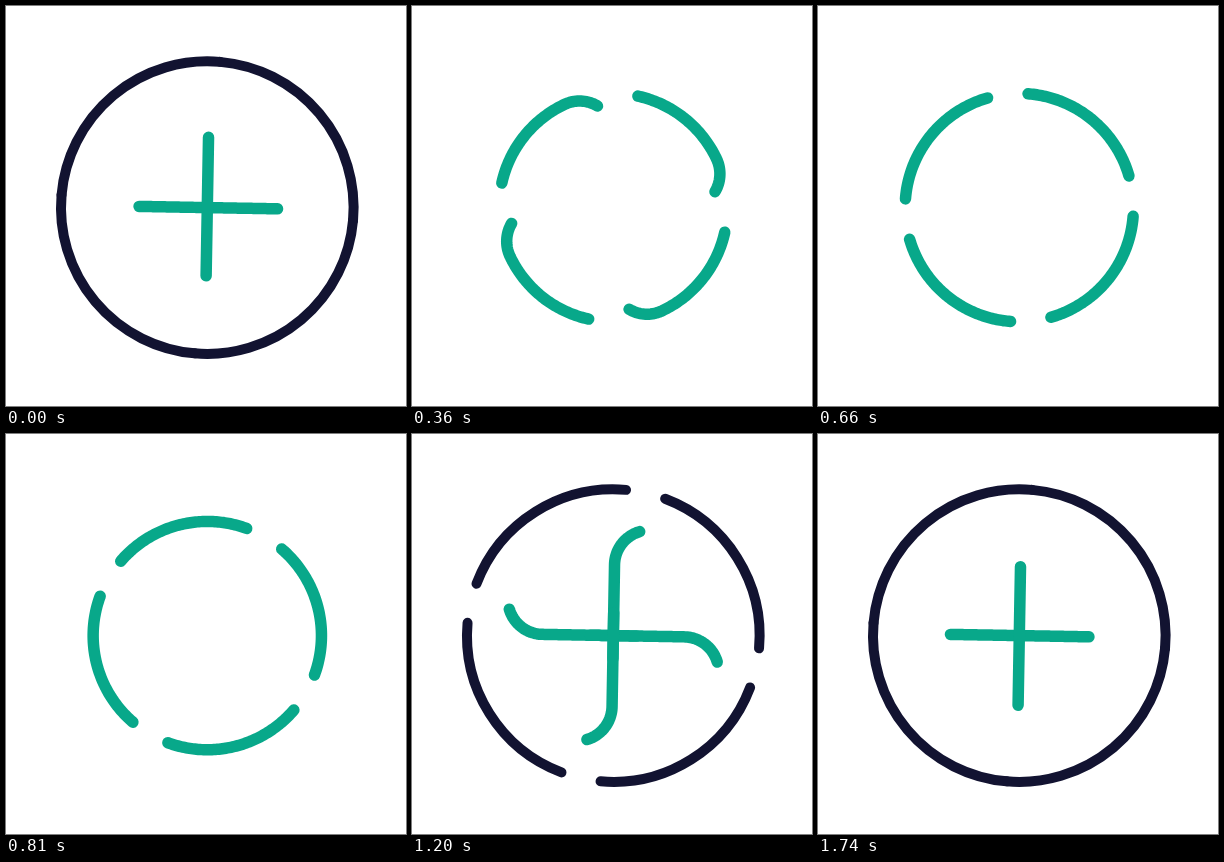
Recreate the animation shown at these times as an HTML page with a canvas. Size 400 by 400 pixels, loop 1.86 s.

```html
<!DOCTYPE html>
<html lang="en">
<head>
<meta charset="utf-8">
<title>Plus loop</title>
<style>
html, body { margin: 0; width: 100%; height: 100%; overflow: hidden; background: #fff; }
canvas { display: block; width: 400px; height: 400px; }
</style>
</head>
<body>
<canvas id="stage"></canvas>
<script>
const canvas = document.getElementById('stage');
const ctx = canvas.getContext('2d');
const dpr = window.devicePixelRatio || 1;
canvas.width = canvas.height = 400 * dpr;

const LOOP = 1860, LAST = 1740, STEP = 30;
const CX = 201.3, CY = 201.6, RAD = Math.PI / 180;
const TILT = RAD;
const RING = 146.3;

// Track of one stroke: out along an arm, round a bend, onto the circle, and back in
const HALF = 69.25, ARM = 71, BEND = 35;
const HUB = Math.hypot(ARM, BEND);
const ORBIT = HUB + BEND;
const JOIN = Math.atan2(-BEND, ARM);
const LINE = HALF + ARM;
const CURVE = LINE + BEND * (Math.PI / 2 - JOIN);
const TRAVEL = 450 * RAD + Math.PI / 2 + 2 * JOIN;
const TOTAL = 2 * CURVE + ORBIT * TRAVEL;
const LEN = 2 * HALF;
const REST = TOTAL - LEN;

// time, distance, speed
const KEYS = [
  [0, 1, 0.04],
  [360, 177, 0.85],
  [660, 551.7, 1.6],
  [810, 838, 1.65],
  [1050, 1114, 0.78],
  [1350, REST - 6.5, 0.04],
  [LAST, REST - 0.4, 0]
];

function distance(t) {
  let i = 0;
  while (i < KEYS.length - 2 && t > KEYS[i + 1][0]) i++;
  const [t0, s0, v0] = KEYS[i], [t1, s1, v1] = KEYS[i + 1];
  const h = t1 - t0, u = (t - t0) / h, w = 1 - u;
  return w * w * ((1 + 2 * u) * s0 + u * h * v0) + u * u * ((3 - 2 * u) * s1 - w * h * v1);
}

function point(d) {
  if (d > TOTAL / 2) {
    const [x, y] = point(TOTAL - d);
    return [-x, y];
  }
  if (d < LINE) return [d - HALF, 0];
  if (d < CURVE) {
    const a = Math.PI / 2 - (d - LINE) / BEND;
    return [ARM + BEND * Math.cos(a), -BEND + BEND * Math.sin(a)];
  }
  const a = JOIN - (d - CURVE) / ORBIT;
  return [ORBIT * Math.cos(a), ORBIT * Math.sin(a)];
}

function smooth(t, from, to) {
  const u = Math.min(1, Math.max(0, (t - from) / (to - from)));
  return u * u * (3 - 2 * u);
}

function quarters(paint) {
  for (let i = 0; i < 4; i++) {
    ctx.save();
    ctx.rotate(i * Math.PI / 2);
    paint(i);
    ctx.restore();
  }
}

function drawRing(t) {
  const tail = 5 - 90 * smooth(t, 0, 335);
  const head = -85;
  const grown = 5 - 90 * smooth(t, 930, 1298);
  const [from, to] = t < 600 ? [tail, head] : [5, grown];
  if (from - to < 0.1) return;
  ctx.strokeStyle = '#121331';
  ctx.lineWidth = 10;
  quarters(() => {
    ctx.beginPath();
    ctx.arc(0, 0, RING, (from - 90) * RAD, (to - 90) * RAD, true);
    ctx.stroke();
  });
}

function drawStrokes(t) {
  const s = distance(t);
  ctx.strokeStyle = '#08a88a';
  ctx.lineWidth = 11.5;
  ctx.rotate(TILT);
  quarters(i => {
    // at rest one stroke per axis is enough
    if (s < 6 && (i === 1 || i === 2)) return;
    if (s > REST - 8 && i < 2) return;
    ctx.beginPath();
    for (let k = 0; k <= 80; k++) ctx.lineTo(...point(s + LEN * k / 80));
    ctx.stroke();
  });
}

function draw(now) {
  const t = Math.min(LAST, Math.floor((now % LOOP) / STEP) * STEP);
  ctx.setTransform(dpr, 0, 0, dpr, 0, 0);
  ctx.fillStyle = '#fff';
  ctx.fillRect(0, 0, 400, 400);
  ctx.lineCap = ctx.lineJoin = 'round';
  ctx.translate(CX, CY);
  drawRing(t);
  drawStrokes(t);
}

let start = null;
function tick(now) {
  if (start === null) start = now;
  draw(Math.max(0, now - start));
  requestAnimationFrame(tick);
}
draw(0);
requestAnimationFrame(tick);
</script>
</body>
</html>
```
